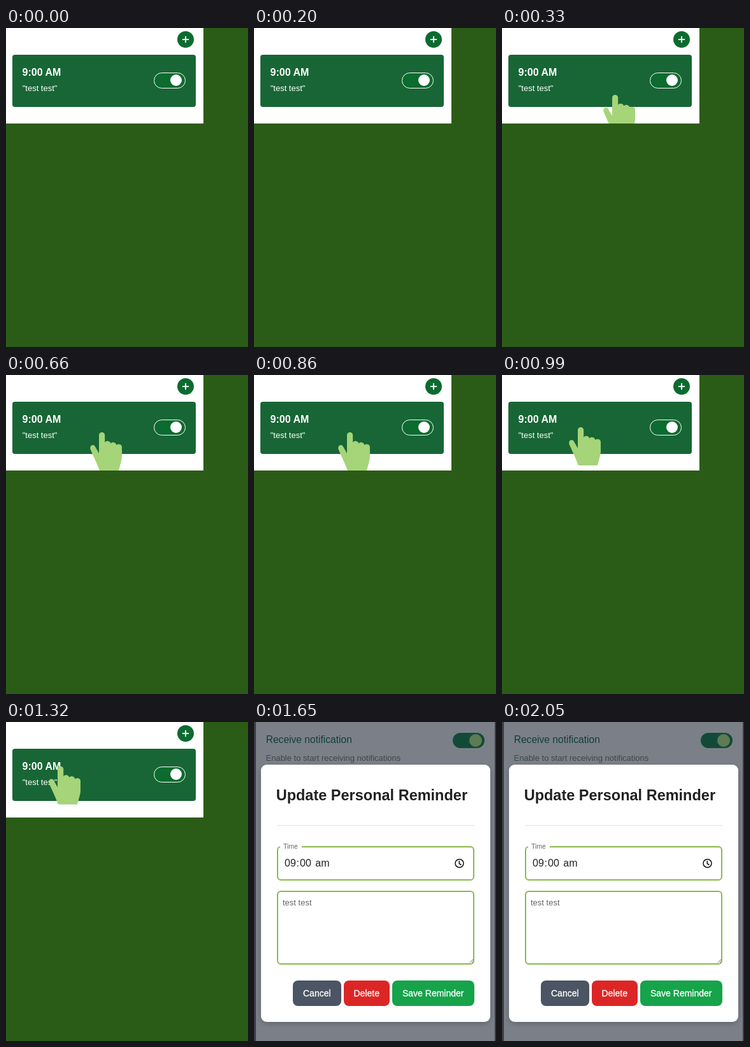
Recreate the animation shown at these times as an HTML page. Size 380x501 px, loop 2310 ms.

```html
<!DOCTYPE html>
<html lang="en">
<head>
<meta charset="utf-8">
<title>Reminder</title>
<style>
  html, body { margin: 0; width: 100%; height: 100%; overflow: hidden; }
  svg { display: block; width: 380px; height: 501px; font-family: "Liberation Sans", Arial, sans-serif; }
  .bold { font-weight: bold; }
  .field { fill: #fff; stroke: #8ab84a; stroke-width: 2; }
  .buttons { fill: #fff; font-size: 14px; }
  .buttons text { stroke: #fff; stroke-width: .3; }
</style>
</head>
<body>
<svg viewBox="0 0 380 501">
  <defs>
    <clipPath id="panel"><path d="M0 0H310V150H0Z"/></clipPath>
    <filter id="shadow" x="-10%" y="-10%" width="120%" height="120%">
      <feDropShadow dx="0" dy="3" stdDeviation="4" flood-opacity=".2"/>
    </filter>
  </defs>

  <g id="list">
    <rect width="380" height="501" fill="#2b5c17"/>
    <rect width="310" height="150" fill="#fff"/>
    <circle cx="282" cy="18" r="13" fill="#0c6b2f"/>
    <path d="M277 18H287M282 13V23" stroke="#fff" stroke-width="2"/>
    <rect x="10" y="42" width="288" height="82" rx="4" fill="#186635"/>
    <g fill="#fff">
      <text x="25.5" y="75" font-size="16" class="bold">9:00 AM</text>
      <text x="25.7" y="99" font-size="13">"test test"</text>
    </g>
    <rect x="232.5" y="70.5" width="49" height="24" rx="12" fill="#0c6b2f" stroke="#fff"/>
    <circle cx="267" cy="82" r="9" fill="#fff"/>
    <g clip-path="url(#panel)">
      <path id="hand" fill="#a5d479" d="M14 4.5a4.6 4.6 0 0 1 9.2 0V16
        C24.5 12.5 31.5 13 32.5 17.5C34.5 14.5 40.5 15.5 41.5 20
        C43.500 17.500 50 18.500 50 23V38Q50 42 48.500 47L45 60H15
        Q13 55 10.500 49L.7 27C-1.500 21 5 17.500 8 22.500L14 33Z"/>
    </g>
  </g>

  <g id="dialog">
    <rect width="380" height="501" fill="#3c3e43"/>
    <rect x="3" width="375" height="501" fill="#7b8088"/>
    <text x="18.7" y="33" font-size="15.6" fill="#123f35">Receive notification</text>
    <text x="18.5" y="61" font-size="13" fill="#3f444b">Enable to start receiving notifications</text>
    <rect x="312" y="17" width="50" height="24" rx="12" fill="#124a38"/>
    <circle cx="348" cy="29" r="10" fill="#5d7b54"/>

    <rect x="11" y="67" width="360" height="404" rx="9" fill="#fff" filter="url(#shadow)"/>
    <text x="34.700" y="123" font-size="23.5" class="bold" fill="#212124">Update Personal Reminder</text>
    <path d="M36 162.500H346" stroke="#e2e2e2"/>

    <rect class="field" x="37" y="196" width="308" height="52" rx="5"/>
    <path d="M41 194H75V198H41Z" fill="#fff"/>
    <text x="46" y="199" font-size="10.500" fill="#666">Time</text>
    <g font-size="16" fill="#212124">
      <text x="48" y="227">09</text>
      <text x="66.500" y="227">:</text>
      <text x="72" y="227">00</text>
      <text x="96.300" y="227">am</text>
    </g>
    <g fill="none" stroke="#111" stroke-width="1.500">
      <circle cx="322.500" cy="222" r="6.500"/>
      <path d="M322.300 218V222.500L325.500 224.500"/>
    </g>

    <rect class="field" x="37" y="266" width="308" height="114" rx="5"/>
    <text x="45" y="288" font-size="13" fill="#666">test test</text>
    <path d="M339 378L344 373M342 378L344 376" stroke="#555" stroke-width=".8"/>

    <g class="buttons">
      <rect x="61" y="406" width="76" height="40" rx="8" fill="#4b5563"/>
      <text x="77" y="431">Cancel</text>
      <rect x="141" y="406" width="72" height="40" rx="8" fill="#dc2626"/>
      <text x="156.500" y="431">Delete</text>
      <rect x="217" y="406" width="129" height="40" rx="8" fill="#16a34a"/>
      <text x="233" y="431">Save Reminder</text>
    </g>
  </g>
</svg>
<script>
  const STEP = 330, LOOP = 2310;
  // Top left corner of the hand at each step; it is away in the first one.
  const spots = [null, [159, 105], [132, 90], [105, 82], [67, 69.5]];
  const [list, hand, dialog] = ["list", "hand", "dialog"].map(id => document.getElementById(id));
  const show = (el, on) => el.setAttribute("display", on ? "inline" : "none");

  function draw() {
    const step = Math.floor(performance.now() % LOOP / STEP);
    const spot = spots[step];
    show(list, step < spots.length);
    show(dialog, step >= spots.length);
    show(hand, spot);
    if (spot) hand.setAttribute("transform", `translate(${spot})`);
    requestAnimationFrame(draw);
  }
  draw();
</script>
</body>
</html>
```
